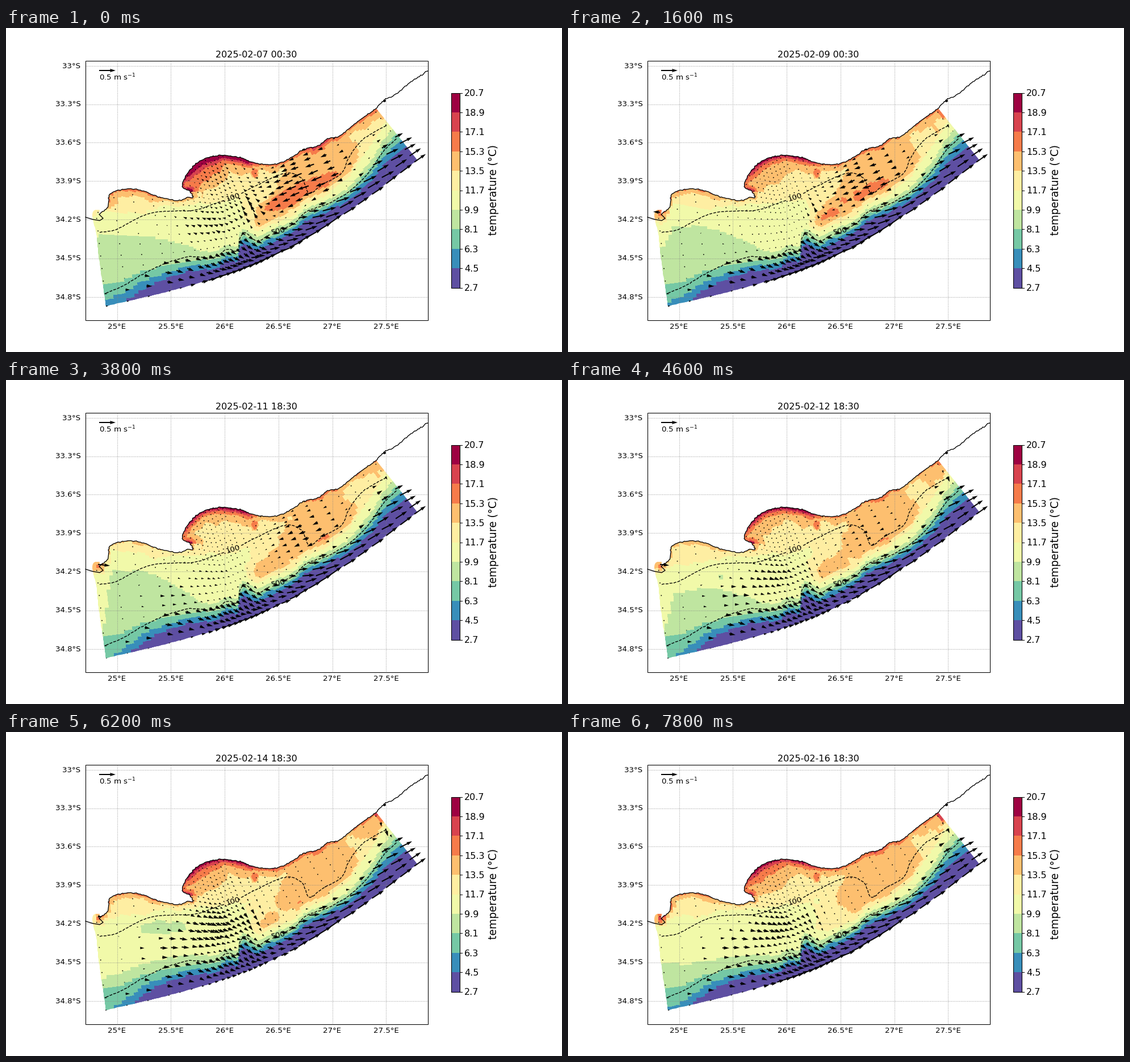
These frames come from a looping animation (979 by 572 pixels, 8000 ms). A matplotlib script:

```python
import numpy as np
import matplotlib.pyplot as plt
from matplotlib.animation import FuncAnimation
from matplotlib.path import Path
from matplotlib.patches import Rectangle

W, H, DPI, N = 979, 572, 96, 40
KEYS = [0, 5, 12, 19, 29, 39]
rng = np.random.default_rng(7)
plt.rcParams["font.family"] = "DejaVu Sans"


def at(n, vals):
    return np.interp(n, KEYS, vals)


def curve(pts, step=2.5, amp=0.5):
    """Smooth path through a few points with a slightly ragged edge."""
    p = np.array(pts, float)
    s = np.r_[0, np.cumsum(np.hypot(*np.diff(p, axis=0).T))]
    m = np.gradient(p, s, axis=0)
    q = np.linspace(0, s[-1], int(s[-1] / step))
    k = np.clip(np.searchsorted(s, q, "right") - 1, 0, len(s) - 2)
    h = (s[k + 1] - s[k])[:, None]
    t = (q - s[k])[:, None] / h
    out = (p[k] * (1 + 2 * t) * (1 - t) ** 2 + m[k] * h * t * (1 - t) ** 2
           + p[k + 1] * t * t * (3 - 2 * t) + m[k + 1] * h * t * t * (t - 1))
    out[1:-1] += rng.normal(0, amp, (len(q) - 2, 2))
    return out


def gauss(x, y, cx, cy, rx, ry, deg=0, power=1):
    a = np.radians(deg)
    dx, dy = x - cx, y - cy
    u = (dx * np.cos(a) + dy * np.sin(a)) / rx
    v = (dy * np.cos(a) - dx * np.sin(a)) / ry
    return np.exp(-(u * u + v * v) ** power)


# --- geography, in stage pixels ---
stub = [(140, 334), (153, 338), (165, 340), (171, 336), (164, 329)]
shore = curve([
    (164, 329), (180, 315), (183, 294), (205, 285), (235, 286), (272, 299),
    (312, 303), (321, 299), (329, 300), (323, 288), (311, 281), (316, 262),
    (330, 244), (350, 231), (380, 225), (412, 229), (442, 239), (480, 239),
    (505, 227), (525, 214), (550, 208), (568, 195), (582, 193), (612, 171),
    (652, 142)])
coast_east = curve([(652, 142), (667, 127), (685, 118), (715, 94), (743, 76)], amp=0.7)
line100 = [(165, 361), (190, 357), (220, 342), (250, 328), (300, 323),
           (330, 322), (365, 311), (386, 304)]
line100b = [(414, 292), (445, 276), (508, 258), (521, 266), (534, 292),
            (556, 277), (592, 255), (604, 228), (625, 200), (671, 171)]
line500 = [(176, 468), (205, 456), (240, 435), (285, 414), (320, 404), (372, 403),
           (388, 391), (408, 394), (412, 370), (418, 362), (442, 376), (466, 364)]
line500b = [(492, 353), (508, 345), (525, 327), (565, 311), (605, 288),
            (645, 247), (665, 217), (688, 195)]
bottom = curve([(134, 501), (176, 491), (290, 464), (385, 436), (480, 397),
                (600, 325), (724, 233), (745, 217)], 6, 0)
rim_x = np.arange(724, 175, -6)
left = curve([(176, 491), (160, 370), (158, 321), (164.5, 321)], 4, 0)
domain = np.vstack([shore, np.c_[rim_x, np.interp(rim_x, *bottom.T)], left, shore[:1]])
sea = Path(domain)
edge500 = np.array([(150, 476)] + line500 + line500b + [(724, 160)], float)


# --- curvilinear grid ---
def grid(i, j):
    bx = np.interp(i, [-1, 0, 3, 6, 9, 17, 21, 24, 31],
                   [134, 176, 287, 345, 380, 455, 515, 570, 744])
    v = np.interp(j, [0, 9, 22], [0, 0.5, 1])
    dx = np.interp(bx, [176, 414, 724], [-42, -68, -154])
    dy = np.interp(bx, [176, 300, 414], [-398, -290, -198])
    return bx + v * dx, np.interp(bx, *bottom.T) + v * dy, v * np.hypot(dx, dy)


def depth_offset(x, y):
    return y - np.interp(x, *edge500.T)


gx, gy, _ = grid(*np.meshgrid(np.arange(-1, 31.01, 0.2), np.arange(0, 22.01, 0.25)))
cx = (gx[1:, 1:] + gx[:-1, :-1]) / 2
cy = (gy[1:, 1:] + gy[:-1, :-1]) / 2
off = depth_offset(cx, cy)
shore_c = shore[:, 0] + 1j * shore[:, 1]
dist = np.array([np.abs(row[:, None] - shore_c).min(1) for row in cx + 1j * cy])
inside = sea.contains_points(np.c_[cx.ravel(), cy.ravel()]).reshape(cx.shape)
hidden = ~(inside | (dist < 9) | (cx < 182) | (cx > 645))

# --- temperature: warm patches as (x, y, rx, ry, angle) and peak ---
BASE = 10.8
STEADY = [((392, 262, 92, 44, -10), 13), ((475, 262, 55, 30, -25), 13),
          ((438, 256, 7, 10, 0), 16.3)]
VARYING = [
    ((222, 299, 62, 29, -3), (13, 12.4, 13, 12.3, 12.3, 12.6)),
    ((357, 257, 42, 31, -20), (15.2, 13.9, 13.8, 12.5, 14.3, 14.8)),
    ((535, 270, 125, 66, -30), (13.3, 13.3, 13, 12.8, 12.6, 12.6)),
    ((548, 260, 110, 53, -33), (14.9, 14.8, 14.2, 14.3, 14.5, 14.6)),
    ((525, 288, 100, 23, -24), (16.9, 16.3, 14.4, 14.6, 12.8, 12.5)),
    ((552, 288, 34, 10, -40), (11, 11, 14, 16.6, 14, 13)),
    ((468, 330, 40, 24, -20), (14.8, 14.8, 16.4, 15, 14, 12.2)),
    ((522, 300, 15, 9, 0), (11, 11, 11, 11, 16.5, 12)),
    ((648, 168, 48, 34, -35), (13.2, 13.2, 13.9, 13.2, 13.8, 13.5)),
    ((661, 153, 26, 9, 52), (13.9, 14.3, 17, 14, 15.8, 17)),
    ((162, 326, 14, 16, 0), (12.8, 14.8, 14.8, 14.2, 12.5, 14.4)),
]
SHAPES = [(gauss(cx, cy, *geo, power=2), peaks)
          for geo, peaks in [(g, [p] * 6) for g, p in STEADY] + VARYING]
COLD = gauss(cx, cy, 275, 345, 50, 14, -3, 2)
BAND_X = [176, 240, 300, 450, 600, 700]
h45 = np.interp(cx, BAND_X, [32, 26, 27, 15, 14, 30])
h63 = np.interp(cx, BAND_X, [12, 12, 17, 8, 7, 10])
h81 = np.interp(cx, BAND_X, [-15, -6, 7, 2, 1, -10])
WIDE = np.interp(cx, [176, 400, 560, 630], [40, 8, 9, 26])
WEST = np.interp(cx, [176, 260], [1, 0])
warm_x = np.where((cy > 289) & (cx < 345), 250, cx)
reach = np.where((cy < 300) & (cx > 305) & (cx < 435), 8.5, 6)


def temperature(n):
    t = np.full(cx.shape, BASE)
    for g, peaks in SHAPES:
        t = np.maximum(t, BASE + (at(n, peaks) - BASE) * g)
    west = at(n, (4, 1.5, 5.5, 2, 4, 3.5))
    bay = at(n, (11, 7.5, 9, 9, 8.5, 7.5))
    mid = at(n, (4, 1, 8, 2.5, 5.5, 5))
    east = at(n, (6.5, 3, 6.5, 4.5, 4.5, 5.5))
    t += np.interp(warm_x, [300, 325, 415, 450, 500, 540, 630],
                   [west, bay, bay, mid, mid, east, east * 0.6]) * np.exp(-dist / reach)
    t += 0.15 * np.sin(cx / 9 + cy / 13 + n / 5) + 0.12 * np.sin(cx / 5 - cy / 7 - n / 4)
    t -= at(n, (0, 0, 0, 0, 1.7, 0)) * COLD

    far = at(n, (-100, -120, -112, -128, -28, -55))
    near = at(n, (-68, -80, -92, -100, -25, -30))
    strip = at(n, (-105, -125, -35, -30, -30, -62))
    h99 = np.interp(cx, [172, 186, 240, 300, 345, 600, 640, 690],
                    [strip, far, near, near * 0.45, -9, -7, -16, -26])
    shift = at(n, (0, 0, 8, 12, 14, 8)) * WEST
    marks = [h45 + shift + 10, h45 + shift, h63 + shift, h81, h99, h99 - WIDE]
    cold = np.full(cx.shape, 2.7)
    for a, b in zip(marks, marks[1:]):
        cold += 1.8 * np.clip((a - off) / np.maximum(a - b, 1), 0, 1)
    cold += 1.8 * np.maximum(0, marks[-1] - off) / 8
    return np.ma.array(np.minimum(t, cold), mask=hidden)


# --- currents: 29 px stands for 0.5 m/s ---
ai, aj = (a.ravel() for a in np.meshgrid(np.arange(31), np.arange(23)))
qx, qy, up = grid(ai, aj)
keep = (aj == 0) | sea.contains_points(np.c_[qx, qy])
qx, qy, up = qx[keep], qy[keep], up[keep]
jitter = rng.normal(0, 0.7, (2, len(qx)))
rim_dir = np.arctan((np.interp(qx - 8, *bottom.T) - np.interp(qx + 8, *bottom.T)) / 16)
rim = np.exp(-(up / 13) ** 2)
deep = 1 / (1 + np.exp(-np.clip((depth_offset(qx, qy) + 8) / 5, -30, 30)))
FLOW_X = [176, 280, 420, 470, 570, 724]
speed = np.interp(qx, FLOW_X, [6, 13, 12, 15, 27, 22])
angle = np.radians(np.interp(qx, FLOW_X, [0, -8, -36, -10, 19, 30]))
jet = np.interp(qx, [176, 300, 380, 480], [5, 3, 20, 25])
rim_east = np.interp(qx, [470, 540], [0, 1])
EDDIES = [  # place, vector, strength
    ((535, 268, 78, 48, -28), (-20, -8), (1, 0.95, 0.5, 0.55, 0.03, 0.1)),
    ((435, 325, 24, 30, 0), (-4, 12), (1, 1, 0.2, -0.1, -0.7, -0.5)),
    ((355, 348, 70, 38, -8), (14, -5), (-0.55, -0.35, 0.12, 0.35, 1, 0.75)),
    ((270, 385, 60, 28, -10), (11, 1), (0.1, 0.1, 0.5, 0.6, 1, 0.9)),
    ((663, 176, 16, 20, 0), (2, -17), (0.1, 0.1, 0.6, 0.3, 1, 0.5)),
    ((385, 262, 66, 36, -10), (-4, 3), (1, 0.5, 0.3, 0.4, -0.7, -0.6)),
    ((650, 205, 28, 24, -40), (9, 7), (0.7, 0.7, 1, 1, 1.1, 1)),
]
SWIRLS = [(gauss(qx, qy, *geo) * (1 - deep), vec, amp) for geo, vec, amp in EDDIES]


def currents(n):
    rim_speed = jet * (rim_east + (1 - rim_east) * at(n, (1, 1, 1, 0.6, 0.3, 0.8)))
    u = deep * ((1 - rim) * speed * np.cos(angle) + rim * rim_speed * np.cos(rim_dir))
    v = deep * ((1 - rim) * speed * np.sin(angle) + rim * rim_speed * np.sin(rim_dir))
    for g, (a, b), amp in SWIRLS:
        k = at(n, amp) * g
        u, v = u + a * k, v + b * k
    inlet = at(n, (0, 0, -28, 21, 9, 1))
    return np.r_[u + jitter[0], inlet], np.r_[v + jitter[1], -inlet / 9]


# --- stage ---
fig = plt.figure(figsize=(W / DPI, H / DPI), dpi=DPI, facecolor="white")
ax = fig.add_axes([0, 0, 1, 1])
ax.set(xlim=(0, W), ylim=(H, 0))
ax.axis("off")
L, T, R, B = 139.5, 57.5, 742.5, 515.5
cmap = plt.get_cmap("Spectral_r", 10)

mesh = ax.pcolormesh(gx, gy, temperature(0), cmap=cmap, vmin=2.7, vmax=20.7, zorder=1)
mesh.set_clip_path(sea, ax.transData)

dots = dict(color="gray", lw=0.8, ls=":", alpha=0.8, zorder=2)
for k in range(6):
    x = 195.5 + 94.75 * k
    ax.plot([x, x], [T, B], **dots)
    ax.text(x, 527.5, f"{25 + k / 2:g}°E", size=10, ha="center", va="center")
for k in range(7):
    y = 67.2 + 67.2 * k + 0.14 * k * k
    ax.plot([L, R], [y, y], **dots)
    ax.text(131.5, y, f"{33 + 0.3 * k:g}°S", size=10, ha="right", va="center")

for line in (line100, line100b, line500, line500b):
    ax.plot(*curve(line, 3, 0.3).T, "k--", lw=1, zorder=3)
for x, y, s, turn in ((400, 299, "100", 17), (479.5, 358.5, "500", 13)):
    ax.text(x, y, s, size=10, rotation=turn, ha="center", va="center", zorder=3)
ax.plot(*np.vstack([stub, shore, coast_east]).T, "k-", lw=1, zorder=3)
ax.plot([666], [127.5], "ko", ms=2.5, zorder=3)

frame = Rectangle((L, T), R - L, B - T, fill=False, ec="k", lw=0.8, zorder=6)
ax.add_patch(frame)
arrow = dict(units="dots", scale_units="dots", scale=1, width=2, color="k", zorder=5)
quiver = ax.quiver(np.r_[qx, 162], np.r_[qy, 325.5], *currents(0), **arrow)
quiver.set_clip_path(frame)
ax.quiver([164], [75], [29], [0], **arrow)
ax.text(164, 92, "0.5 m s$^{-1}$", size=10)
title = ax.text(440.5, 52.5, "", size=12, ha="center")

# colour bar
x0, x1, y0, y1 = 783.5, 798.5, 458.5, 114.5
dy = (y1 - y0) / 10
for k in range(11):
    y = y0 + k * dy
    if k < 10:
        ax.add_patch(Rectangle((x0, y), x1 - x0, dy, fc=cmap(k), lw=0, antialiased=False))
    ax.plot([x1, x1 + 4.7], [y, y], "k-", lw=0.8)
    ax.text(807, y, f"{2.7 + 1.8 * k:.1f}", size=12, va="center_baseline")
ax.add_patch(Rectangle((x0, y1), x1 - x0, y0 - y1, fill=False, ec="k", lw=0.8, zorder=4))
ax.text(858, 286, "temperature (°C)", size=14, rotation=90, ha="center", va="center")


def update(n):
    hours = 6 * n
    title.set_text(f"2025-02-{7 + hours // 24:02d} {hours % 24:02d}:30")
    mesh.set_array(temperature(n))
    quiver.set_UVC(*currents(n))
    return mesh, quiver, title


anim = FuncAnimation(fig, update, frames=N, interval=200, repeat=True, repeat_delay=0)
plt.show()
```
